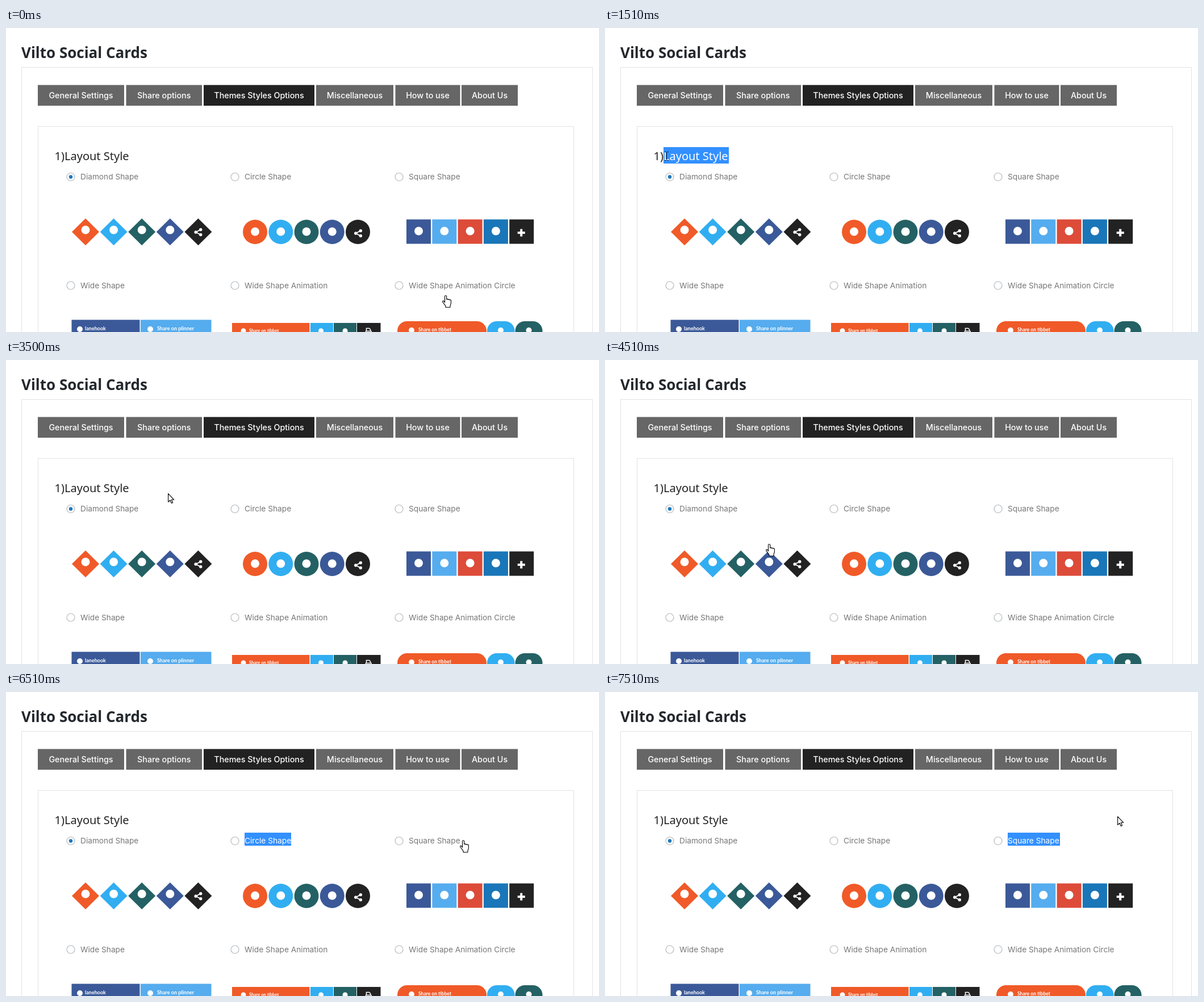
Recreate the animation shown at these times as an HTML page. Size 1044x536 px, loop 8000 ms.

```html
<!DOCTYPE html>
<html lang="en">
<head>
<meta charset="utf-8">
<title>Layout settings</title>
<style>
html, body { margin: 0; width: 100%; height: 100%; overflow: hidden; background: #fff; }
svg { display: block; }
.title { font: 600 26px "Noto Sans", sans-serif; fill: #23282d; }
.heading { font: 400 20px "Noto Sans", sans-serif; fill: #222; }
.label { font: 400 13.7px Inter, sans-serif; fill: #777; }
.tab { font: 500 14.3px Inter, sans-serif; fill: #fff; text-anchor: middle; }
.small { font-family: Lato, sans-serif; font-weight: 700; fill: #fff; }
.selection .heading, .selection .label { fill: #fff; }
.selection { opacity: 0; }
.timed { animation: 8s step-end infinite; }
#hand { animation-name: hand; }
#arrow { animation-name: arrow; }
#beam { animation-name: beam; }
#pickHeading { animation-name: pickHeading; }
#pickPart { animation-name: pickPart; }
#pickCircle { animation-name: pickCircle; }
#pickSquare { animation-name: pickSquare; }

@keyframes hand {
  0% { transform: translate(768px, 471px); }
  6.25% { transform: translate(204px, 253px); }
  12.625% { transform: translate(-99px, 0); }
  25.125% { transform: translate(196px, 292px); }
  31.375% { transform: translate(393px, 243px); }
  37.5% { transform: translate(-99px, 0); }
  56.375% { transform: translate(283px, 324px); }
  62.5% { transform: translate(485px, 275px); }
  69% { transform: translate(426px, 261px); }
  75.125% { transform: translate(565px, 281px); }
  81.375% { transform: translate(799px, 261px); }
  87.625% { transform: translate(682px, 254px); }
  93.875%, 100% { transform: translate(-99px, 0); }
}
@keyframes arrow {
  0% { transform: translate(-99px, 0); }
  12.625% { transform: translate(222px, 228px); }
  18.875% { transform: translate(-99px, 0); }
  37.5% { transform: translate(305px, 220px); }
  43.75% { transform: translate(285px, 235px); }
  50.125% { transform: translate(489px, 230px); }
  56.375% { transform: translate(-99px, 0); }
  93.875%, 100% { transform: translate(902px, 219px); }
}
@keyframes beam {
  0% { transform: translate(-99px, 0); }
  18.875% { transform: translate(104px, 218px); }
  25.125%, 100% { transform: translate(-99px, 0); }
}
@keyframes pickHeading { 0%, 43.75%, 100% { opacity: 0; } 18.875% { opacity: 1; } }
@keyframes pickPart { 0%, 75.125%, 100% { opacity: 0; } 69% { opacity: 1; } }
@keyframes pickCircle { 0%, 87.625%, 100% { opacity: 0; } 75.125% { opacity: 1; } }
@keyframes pickSquare { 0% { opacity: 0; } 87.625%, 100% { opacity: 1; } }
</style>
</head>
<body>
<svg id="stage" width="1044" height="536" viewBox="0 0 1044 536"></svg>
<script>
const orange = '#f05a28', sky = '#31aef1', teal = '#246164', navy = '#3b5998',
  black = '#222', azure = '#55acee', red = '#dd4b39', blue = '#1976b8';

const rect = (x, y, w, h, fill, extra = '') =>
  `<rect x="${x}" y="${y}" width="${w}" height="${h}" fill="${fill}" ${extra}/>`;
const circle = (x, y, r, fill, extra = '') =>
  `<circle cx="${x}" cy="${y}" r="${r}" fill="${fill}" ${extra}/>`;
const text = (cls, x, y, str, extra = '') =>
  `<text class="${cls}" x="${x}" y="${y}" ${extra}>${str}</text>`;
const dot = (x, y, r = 7.5) => circle(x, y, r, '#fff');
const small = (x, y, size, str) => text('small', x, y, str, `font-size="${size}"`);
const frame = (x, y, w) => rect(x, y, w, 600, 'none', 'stroke="#e3e3e3"');

const shareIcon = (x, y) =>
  `<path d="M${x + 4} ${y - 4.5}L${x - 4} ${y}L${x + 4} ${y + 4.5}" fill="none" stroke="#fff" stroke-width="2"/>` +
  dot(x + 4.3, y - 4.5, 2.7) + dot(x - 4.3, y, 2.7) + dot(x + 4.3, y + 4.5, 2.7);

const tab = (x, right, str, active) =>
  rect(x, 100.5, right - x, 36.5, active ? black : '#666') + text('tab', (x + right) / 2, 124, str);

const option = (x, y, str, checked) =>
  circle(x, y, 7, '#fff', 'stroke="#b4b9be" stroke-width="1.2"') +
  (checked ? circle(x, y, 3.2, '#1e78be') : '') +
  text('label', x + 17, y + 4.5, str);

// The nested svg clips the white text to the highlighted area.
const selection = (id, x, y, w, h, label) =>
  `<g id="${id}" class="selection timed"><svg x="${x}" y="${y}" width="${w}" height="${h}" viewBox="${x} ${y} ${w} ${h}">` +
  rect(x, y, w, h, '#3390ff') + label + '</svg></g>';

const diamonds = [orange, sky, teal, navy, black].map((fill, i) => {
  const x = 140 + i * 49.6;
  return `<path d="M${x - 24} 359.5l24 -23.7 24 23.7 -24 23.7z" fill="${fill}"/>` +
    (i < 4 ? dot(x, 356) : shareIcon(x, 360));
});

const circles = [orange, sky, teal, navy, black].map((fill, i) => {
  const x = 438.5 + i * 45.25;
  return circle(x, 359.5, 21.5, fill) + (i < 4 ? dot(x, 359) : shareIcon(x + .5, 362));
});

const squares = [navy, azure, red, blue, black].map((fill, i) => {
  const x = 705 + i * 45.3;
  return rect(x, 337.5, 43, 43, fill) + (i < 4 ? dot(x + 21.5, 358) :
    rect(x + 14.5, 359, 13, 4, '#fff') + rect(x + 19, 354.5, 4, 13, '#fff'));
});

const wide =
  rect(115.5, 514.5, 120, 40, navy) + dot(130, 531, 5) + small(139, 533, 9, 'lanehook') +
  rect(237, 514.5, 124.5, 40, azure) + dot(254, 531, 5) + small(266, 533, 9, 'Share on plinner');

const wideSlide =
  rect(398, 520, 136.5, 40, orange) + dot(418, 534, 4.5) + small(428, 536, 7.7, 'Share on tibbet') +
  rect(536, 520, 40, 40, sky) + dot(554.5, 534, 4.5) +
  rect(577, 520, 40, 40, teal) + dot(597, 534, 4.5) +
  rect(618, 520, 41.5, 40, black) +
  '<path d="M634.5 534v-4.5h5l2 2v2.5M633.5 538v-3.5h9.5v3.5" fill="none" stroke="#fff" stroke-width="1.5"/>';

const wideRound =
  rect(689, 517, 157, 34, orange, 'rx="17"') + dot(714, 533, 5) + small(726, 535, 8.5, 'Share on tibbet') +
  rect(847, 517, 48.5, 34, sky, 'rx="17"') + dot(871, 533, 5) +
  rect(896.5, 517, 48, 34, teal, 'rx="17"') + dot(920.5, 533, 5);

const heading = text('heading', 103, 233, 'Layout Style');
const circleLabel = text('label', 420, 267, 'Circle Shape');
const squareLabel = text('label', 709, 267, 'Square Shape');

const cursor = (id, d, style) => `<path id="${id}" class="timed" d="${d}" ${style}/>`;
const outlined = 'fill="#fff" stroke="#000" stroke-width="1.1" stroke-linejoin="round"';

document.getElementById('stage').innerHTML = [
  text('title', 27, 53, 'Vilto Social Cards'),
  frame(27.5, 69.5, 1005), frame(56.5, 173.5, 943),
  tab(56, 208, 'General Settings'), tab(211.5, 345, 'Share options'),
  tab(348, 543, 'Themes Styles Options', true), tab(546, 682, 'Miscellaneous'),
  tab(685.5, 799.5, 'How to use'), tab(802, 901, 'About Us'),
  text('heading', 85.5, 233, '1)'), heading,
  option(114, 262.5, 'Diamond Shape', true), option(403, 262.5, 'Circle Shape'),
  option(692, 262.5, 'Square Shape'), option(114, 454, 'Wide Shape'),
  option(403, 454, 'Wide Shape Animation'), option(692, 454, 'Wide Shape Animation Circle'),
  ...diamonds, ...circles, ...squares, wide, wideSlide, wideRound,
  selection('pickHeading', 103, 210, 115, 29, heading),
  selection('pickPart', 433, 248, 69, 23, circleLabel),
  selection('pickCircle', 420, 248, 82, 23, circleLabel),
  selection('pickSquare', 709, 248, 92, 23, squareLabel),
  cursor('beam', 'M1 .5H3.5L4.5 1.5 5.5 .5H8M4.5 1.5V14.5M1 15.5H3.5L4.5 14.5 5.5 15.5H8', 'fill="none" stroke="#111"'),
  cursor('arrow', 'M.6 .6V15.3L4 12.2 6.4 17.5 8.6 16.5 6.3 11.3H10.8Z', outlined),
  cursor('hand', 'M4.5 13V2.3a1.6 1.6 0 0 1 3.2 0V7.5a1.5 1.5 0 0 1 2.7 .6 1.4 1.4 0 0 1 2.6 .5 ' +
    '1.3 1.3 0 0 1 2.4 .8V14c0 2 -1.5 3.5 -1.5 5.5V21.5H6V19.5C5 17 2 14.5 .8 11.9 .2 10 2.2 9.6 3.2 11Z', outlined)
].join('');
</script>
</body>
</html>
```
